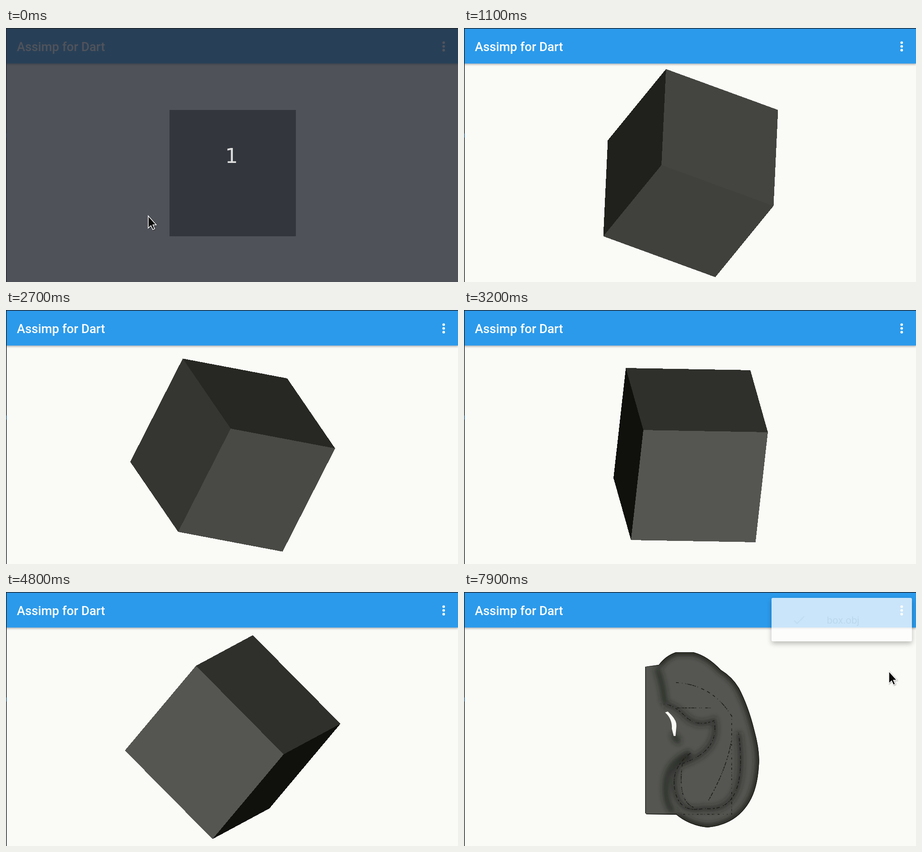
Recreate the animation shown at these times as an HTML page. Size 998 px wide and 561 px high, loop 8 s.

```html
<!DOCTYPE html>
<html lang="en">
<head>
<meta charset="utf-8">
<title>Assimp for Dart</title>
<style>
  html, body { margin: 0; width: 100%; height: 100%; overflow: hidden; background: #fafaf6; }
  svg { position: absolute; left: 0; top: 0; }
  text { font-family: Roboto, sans-serif; }
  #bar { filter: drop-shadow(0 2px 2px rgba(0, 0, 0, .3)); }
  #cube { shape-rendering: crispEdges; }
  #menu { position: absolute; right: 9.5px; top: 12.5px; overflow: hidden; background: #fff;
    border-radius: 3px; box-shadow: 0 5px 12px rgba(0, 0, 0, .35); }
  #menu svg { left: auto; right: 0; }
  #cursor { filter: drop-shadow(1px 1px 1px rgba(0, 0, 0, .4)); }
  #shade { fill: none; stroke: #20211d; stroke-width: 13; filter: url(#blur); }
  #creases { fill: none; stroke: #1b1c18; stroke-width: 1.6; }
</style>
</head>
<body>
<svg width="998" height="561">
  <defs>
    <filter id="blur"><feGaussianBlur stdDeviation="6"/></filter>
    <path id="rim" d="M430 161Q446 140 468 133H506Q538 141 567 172Q592 187 607 212Q628 252 641 305
      Q654 352 651 384Q648 434 630 464Q600 514 538 520Q498 516 469 492"/>
    <path id="plate" d="M400 165L430 161H480V492L403 491L400 488Z"/>
    <clipPath id="earClip"><use href="#rim"/><use href="#plate"/></clipPath>
    <clipPath id="barClip"><path d="M1 1H998V78.5H1Z"/></clipPath>
  </defs>

  <g id="cube"><polygon/><polygon/><polygon/></g>

  <g id="ear">
    <g clip-path="url(#earClip)">
      <path d="M400 130H660V530H400Z" fill="#555651"/>
      <g id="shade">
        <use href="#rim"/>
        <g opacity=".7">
          <path d="M426 168Q440 205 443 245"/>
          <path d="M500 355Q450 375 446 420T462 486"/>
          <path d="M478 330Q463 328 464 312"/>
        </g>
      </g>
      <g id="creases"></g>
      <use href="#rim" fill="none" stroke="#171814" stroke-width="2"/>
      <path d="M400 165V491H470M403 164L430 161" fill="none" stroke="#171814" stroke-width="2.5"/>
    </g>
    <path d="M444 266L450 264L458 272Q470 285 469 296L467 318H463L459 302Q460 280 444 266Z" fill="#fafaf6"/>
  </g>

  <path id="bar" d="M0 1H998V78.5H0Z" fill="#2b9aeb"/>
  <circle id="hover" cx="966" cy="40.5" r="47" opacity=".05" clip-path="url(#barClip)"/>
  <text x="24" y="50.5" font-size="27.55" font-weight="500" fill="#fff">Assimp for Dart</text>
  <path d="M966.4 32.3v0m0 8.3v0m0 8.3v0" stroke="#fff" stroke-width="5.8" stroke-linecap="round"/>
  <path d="M0 0H998V1.5H1.5V561H0Z" fill="#1d2228"/>
  <path d="M0 233h1.2v9H0z" fill="#2f7fbd"/>
</svg>

<div id="menu">
  <svg width="310" height="256" font-size="22.2">
    <path class="item" transform="translate(44 32) scale(1.39)" fill-opacity=".54"
      d="M9 16.17L4.83 12l-1.42 1.41L9 19 21 7l-1.41-1.41z"/>
  </svg>
</div>

<svg width="998" height="561">
  <g id="countdown">
    <path d="M0 1H998V561H0Z" fill="rgb(40,44,53)" opacity=".81"/>
    <text x="498" y="298" font-size="44" text-anchor="middle" fill="#dfdfdf" style="font-family:'DejaVu Sans',sans-serif">1</text>
  </g>
  <path id="cursor" d="M0 0V27L6 21.5L10.2 30.3L14.2 28.4L10.3 19.8H17.8Z" fill="#0b0b0b" stroke="#fff" stroke-width="1.5"/>
</svg>

<script>
const LOOP = 8000, STEP = 100, SIZE = 279, CENTER = [500.5, 320.5];
const FILES = ['box.obj', 'ear.ply', 'spider.obj'], ROW = 78;
const SVG = 'http://www.w3.org/2000/svg';

// time, then pitch, yaw and roll in degrees
const poses = [
  [400, 0, 0, 0], [1100, 40.5, 25.7, 2.7], [2000, -16.1, 29.4, 14], [3200, -28.8, 11.1, 6.4],
  [4800, -28.9, -10.9, 40], [5000, -63, -18, 36], [5300, -67.5, -18.1, 33.7]
];
// time, then position of the pointer
const pointer = [
  [200, 314, 415], [5600, 885, 418], [5800, 970, 446], [6200, 839, 88],
  [6400, 970, 39], [6900, 970, 39], [7600, 932, 118], [7800, 938, 175]
];
const creases = [
  'M441 248Q462 248 488 274T552 284Q566 350 482 379',
  'M500 356Q455 390 466 440T530 478Q630 490 606 310',
  'M482 380Q470 470 515 478', 'M590 330Q580 390 540 460',
  'M468 200Q550 205 592 276', 'M470 256H545', 'M484 491H591V270'
];

const $ = id => document.getElementById(id);
const show = (id, on) => { $(id).style.visibility = on ? 'visible' : 'hidden'; };
const interval = (p, from, to) => Math.min(1, Math.max(0, (p - from) / (to - from)));

function add(parent, tag, attributes) {
  const node = parent.appendChild(document.createElementNS(SVG, tag));
  for (const name in attributes) node.setAttribute(name, attributes[name]);
  return node;
}

function segment(keys, t) {
  const i = Math.max(1, keys.findIndex(k => k[0] > t));
  const [a, b] = t >= keys.at(-1)[0] ? keys.slice(-2) : [keys[i - 1], keys[i]];
  const f = interval(t, a[0], b[0]);
  return { f, span: b[0] - a[0], value: a.slice(1).map((v, j) => v + (b[j + 1] - v) * f) };
}

// Long drags swing out sideways between two poses.
function poseAt(t) {
  const { f, span, value: [pitch, yaw, roll] } = segment(poses, t);
  const swing = 18 * Math.min(1, (span / 1000) ** 2) * Math.sin(Math.PI * f);
  return [pitch, yaw + swing, roll + swing];
}

function rotate([x, y, z], [pitch, yaw, roll]) {
  const turn = (a, b, deg) => {
    const r = deg * Math.PI / 180, c = Math.cos(r), s = Math.sin(r);
    return [a * c - b * s, a * s + b * c];
  };
  [z, x] = turn(z, x, yaw);
  [y, z] = turn(y, z, pitch);
  [x, y] = turn(x, y, roll);
  return [x, y, z];
}

function drawCube(angles) {
  const axes = [[1, 0, 0], [0, 1, 0], [0, 0, 1]].map(v => rotate(v, angles));
  [...$('cube').children].forEach((face, i) => {
    const n = axes[i], u = axes[(i + 1) % 3], v = axes[(i + 2) % 3];
    const side = n[2] < 0 ? -1 : 1, shade = 100 * Math.abs(n[2]) - 1;
    const corners = [[1, 1], [1, -1], [-1, -1], [-1, 1]].map(([a, b]) =>
      CENTER.map((c, k) => c + SIZE / 2 * (side * n[k] + a * u[k] + b * v[k])));
    face.setAttribute('points', corners.join(' '));
    face.setAttribute('fill', `rgb(${shade},${shade + 1},${shade - 4})`);
  });
}

function drawMenu(p) {
  const unit = 1 / (FILES.length + 1.5), style = $('menu').style;
  style.width = 309.5 * interval(p, 0, unit) + 'px';
  style.height = (ROW * FILES.length + 22) * interval(p, 0, unit * FILES.length) + 'px';
  style.opacity = interval(p, 0, 1 / 3);
  document.querySelectorAll('.item').forEach((item, i) => {
    const row = Math.max(1, i);
    item.setAttribute('opacity', interval(p, unit * row, unit * (row + 1.5)));
  });
}

function build() {
  FILES.forEach((name, i) => {
    add($('menu').firstElementChild, 'text',
      { class: 'item', x: 122, y: 56.5 + ROW * i, 'fill-opacity': .87 }).textContent = name;
  });
  let seed = 7;
  const random = () => (seed = seed * 16807 % 2147483647) / 2147483647;
  creases.forEach((d, i) => {
    if (i < 2) add($('shade'), 'path', { d, opacity: .55 });
    const dashes = Array.from({ length: 20 }, () => 1 + 8 * random() ** 2);
    add($('creases'), 'path', { d, 'stroke-dasharray': dashes });
  });
}

function draw(time) {
  const t = Math.floor(time % LOOP / STEP) * STEP;
  show('countdown', t < 200);
  show('cube', t < 7800);
  show('ear', t >= 7800);
  show('hover', t >= 6400 && t < 6800);
  show('cursor', t < 200 || t >= 5600 && t < 5800 || t >= 6200);
  drawCube(poseAt(t));
  drawMenu(Math.min(interval(t, 6500, 6800), interval(t, 7950, 7750)));
  $('cursor').setAttribute('transform', `translate(${segment(pointer, t).value})`);
}

function tick() {
  draw(performance.now());
  requestAnimationFrame(tick);
}
build();
tick();
</script>
</body>
</html>
```
